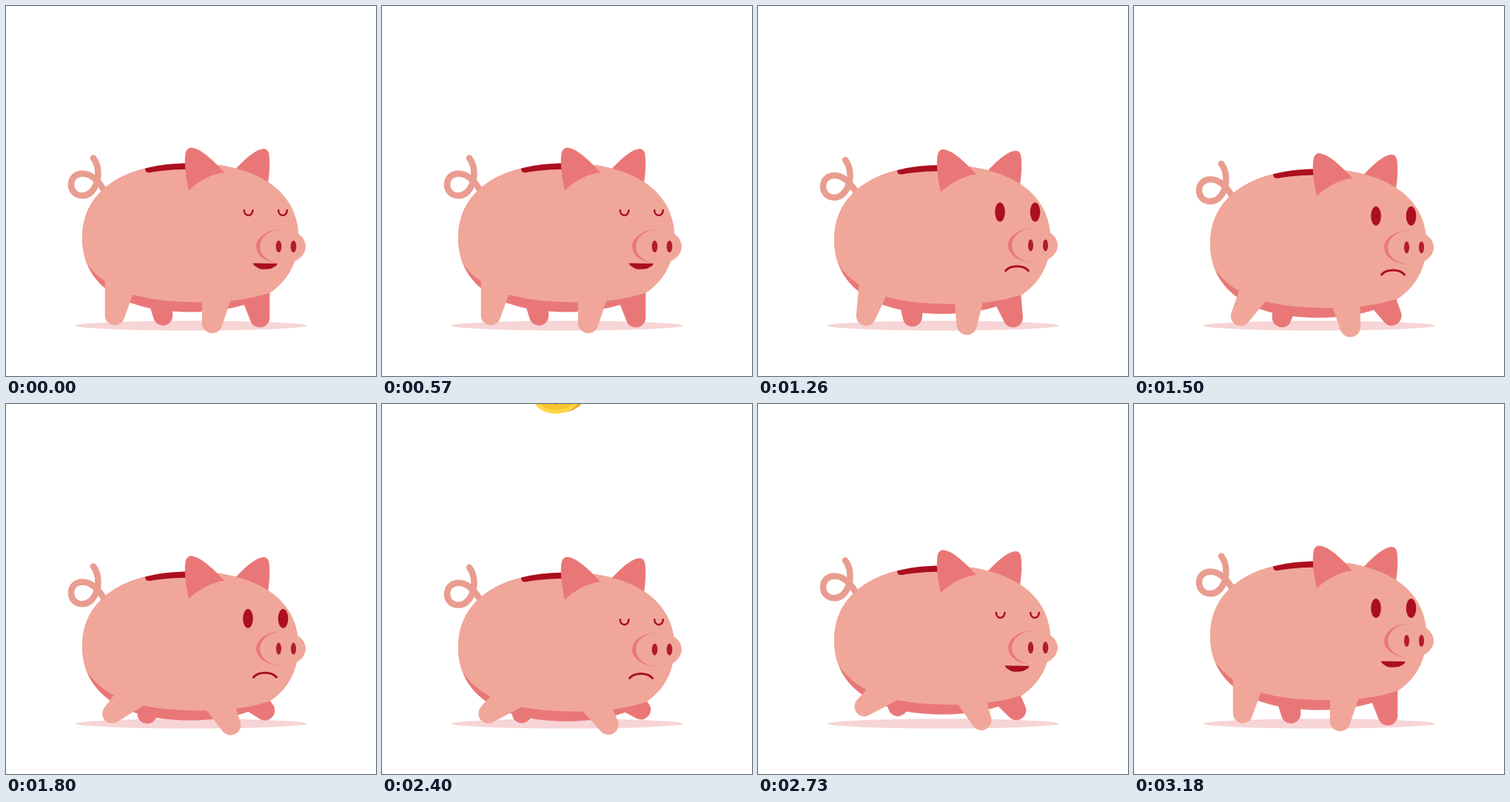
An HTML page with a canvas that plays this animation: 500x500 px, repeating every 3210 ms.

```html
<!DOCTYPE html>
<html lang="en">
<head>
<meta charset="utf-8">
<title>Piggy bank</title>
<style>
html, body { margin: 0; width: 100%; height: 100%; overflow: hidden; background: #fff; }
canvas { display: block; width: 500px; height: 500px; }
</style>
</head>
<body>
<canvas id="stage" width="500" height="500"></canvas>
<script>
const ctx = document.getElementById('stage').getContext('2d');
const LOOP = 3210, STEP = 30;
const PINK = '#f0a799', ROSE = '#ea7778', RED = '#ab0f20', TAIL = '#e99d90';

const shapes = {
  body: 'M103 313C103 252 156 212.500 249 212.500C342 212.500 395 252 395 313C395 377 342 413.500 249 413.500C158 413.500 103 378 103 313Z',
  belly: 'M90 200H410V313C402 345 382 376 357 387.500C320 399 290 401 250 400C190 399 136 388 109 347L90 313Z',
  slot: 'M188 219.5Q214 212.5 249 212.5V220.5Q215 221 195 225Q188 226 188 219.5Z',
  leftEar: 'M247 249C243 232 240 210 243 197Q246 189.500 254 192C268 196 285 214 295 225C277 227 260 237 247 249Z',
  rightEar: 'M308 223C321 208 335 196 345 193.500Q354 191 355.500 201C357 214 356 226 354 240L330 250Z',
  tail: 'M118 205.5C126 216 126 232 121 243C116 253 110 256.300 103 256.300C93.500 256.300 88 249.500 88 241.500C88 232 95 226.500 103 226.500C115 226.500 125 236 133 250',
  smile: 'M333.5 347.5L366.500 348Q367 351 358 355Q350.500 356.500 343 355.300Q334.500 351 333.500 347.500Z',
  frown: 'M334.5 355.2C342 347.300 358 347.300 365.500 355.200',
  lid: 'M-5.8 0C-5.800 9.200 5.800 9.200 5.800 0'
};
const paths = {};
for (const name in shapes) paths[name] = new Path2D(shapes[name]);

// Each leg swings around its hip by `turn` degrees when the pig slumps.
const legs = {
  backFar: { hip: [221, 380.5], foot: [212, 418.5], r: 13.2, left: [190, 391], right: [225.2, 391], arc: [0, 163], turn: 42 },
  frontFar: { hip: [314.5, 400], foot: [343, 421], r: 13.3, left: [317, 392], right: [356.3, 385], arc: [0, 158], turn: -40 },
  backNear: { hip: [165, 406], foot: [147, 418], r: 13.3, left: [133.7, 371], right: [178, 372], arc: [20, 180], turn: 42 },
  frontNear: { hip: [278.5, 387.5], foot: [278.5, 428.5], r: 13.7, left: [264.8, 388], right: [306, 391], arc: [20, 180], turn: -42 }
};

// Snout height relative to the body: time, offset
const snoutKeys = [
  [0, 0], [285, -5], [570, 0], [855, -5], [1050, -3], [1800, -8.3], [2070, -8.6],
  [2550, -8.6], [2760, -1.2], [2940, 0], [3180, -5], [3210, -5]
];

const rad = deg => deg * Math.PI / 180;
const ramp = (t, a, b) => Math.min(1, Math.max(0, (t - a) / (b - a)));
const smooth = s => s * s * (3 - 2 * s);
const ease = (t, a, b) => smooth(ramp(t, a, b));

function keyed(keys, t) {
  const i = Math.max(1, keys.findIndex(k => k[0] >= t));
  const [t0, v0] = keys[i - 1], [t1, v1] = keys[i];
  return v0 + (v1 - v0) * ease(t, t0, t1);
}

function fill(path, color) {
  ctx.fillStyle = color;
  ctx.fill(path);
}

function line(path, color, width) {
  ctx.strokeStyle = color;
  ctx.lineWidth = width;
  ctx.lineCap = 'round';
  ctx.stroke(path);
}

function oval(x, y, rx, ry, color, from = 0, to = 360) {
  ctx.beginPath();
  ctx.ellipse(x, y, rx, ry, 0, rad(from), rad(to));
  ctx.fillStyle = color;
  ctx.fill();
}

function drawLeg({ hip, foot, r, left, right, arc, turn }, slump, color) {
  ctx.save();
  ctx.translate(...hip);
  ctx.rotate(rad(turn * slump));
  ctx.translate(-hip[0], -hip[1]);
  ctx.beginPath();
  ctx.moveTo(...right);
  ctx.arc(...foot, r, rad(arc[0]), rad(arc[1]));
  ctx.lineTo(...left);
  ctx.fillStyle = color;
  ctx.fill();
  ctx.restore();
}

function drawEyes(closed) {
  if (!closed) {
    for (const x of [327, 374.5]) oval(x, 276, 6.8, 13, RED);
    return;
  }
  for (const x of [327.6, 374]) {
    ctx.save();
    ctx.translate(x, 276);
    line(paths.lid, RED, 2.5);
    ctx.restore();
  }
}

function drawSnout(dy, flare) {
  const y = 325 + dy;
  oval(373, y, 35, 23.3, ROSE, 90, 270);
  oval(374, y, 31, 23.3, PINK);
  for (const x of [368.5, 388.5]) oval(x, y, flare ? 3.8 : 3.5, 8, '#b01c2b');
}

function drawCoin(t, drop) {
  if (t < 2400 || t >= 2580) return;
  const s = ramp(t, 2400, 2580);
  ctx.save();
  ctx.beginPath();
  ctx.rect(0, 0, 500, 217 + drop);
  ctx.clip();
  ctx.translate(236 - 16 * s, -12 + 268 * s);
  ctx.rotate(-0.06);
  oval(6, -1, 33, 25, '#eda32c');
  oval(0, 0, 33, 25, '#ffd642');
  oval(0, 0, 27, 20, '#f9c22f');
  ctx.beginPath();
  ctx.moveTo(-2, 15);
  ctx.lineTo(-10, 0);
  ctx.lineTo(-2, -15);
  ctx.lineTo(6, 0);
  ctx.fillStyle = '#eda32c';
  ctx.fill();
  ctx.restore();
}

function draw(t) {
  const rise = 1 - (1 - ramp(t, 2550, 3030)) ** 2;
  const drop = 15.3 * ease(t, 1015, 1980) * (1 - rise);
  const slump = (from, to) => ease(t, 1060, 1980) * (1 - ease(t, from, to));
  const closed = t < 900 || (t >= 2070 && t < 3030);
  const sad = t >= 1050 && t < 2550;

  ctx.fillStyle = '#fff';
  ctx.fillRect(0, 0, 500, 500);
  oval(250, 432, 156.5, 6.5, '#f7d4d5');

  ctx.save();
  ctx.translate(0, drop);
  drawLeg(legs.backFar, slump(2730, 3150), ROSE);
  drawLeg(legs.frontFar, slump(2550, 2960), ROSE);
  fill(paths.rightEar, ROSE);
  line(paths.tail, TAIL, 8.5);
  fill(paths.body, ROSE);
  ctx.save();
  ctx.clip(paths.belly);
  fill(paths.body, PINK);
  ctx.restore();
  fill(paths.slot, RED);
  ctx.restore();

  drawCoin(t, drop);

  ctx.save();
  ctx.translate(0, drop);
  drawLeg(legs.backNear, slump(2730, 3150), PINK);
  drawLeg(legs.frontNear, slump(2600, 3090), PINK);
  fill(paths.leftEar, ROSE);
  drawEyes(closed);
  drawSnout(keyed(snoutKeys, t), closed);
  if (sad) line(paths.frown, RED, 3);
  else fill(paths.smile, RED);
  ctx.restore();
}

let start;
function tick(now) {
  if (start === undefined) start = now;
  const t = (now - start) % LOOP;
  draw(Math.floor(t / STEP) * STEP);
  requestAnimationFrame(tick);
}
draw(0);
requestAnimationFrame(tick);
</script>
</body>
</html>
```
